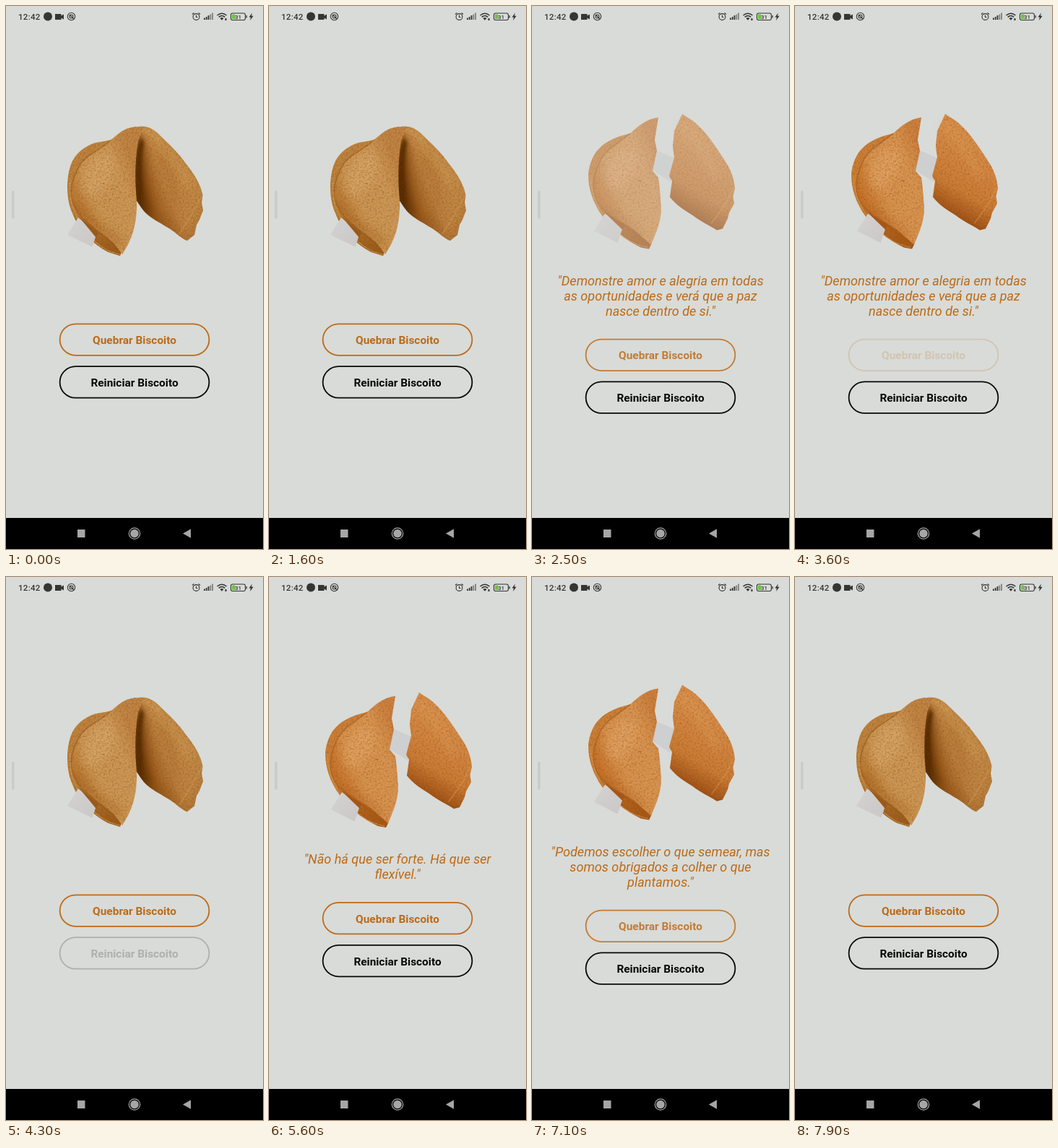
Write an HTML page that moves like this. It is 356 by 752 pixels and loops after 8 s.

```html
<!DOCTYPE html>
<html lang="pt">
<head>
<meta charset="utf-8">
<title>Biscoito da sorte</title>
<style>
  html, body { margin: 0; width: 100%; height: 100%; overflow: hidden; background: #d8dbd8; }
  svg { display: block; width: 356px; height: 752px; }
  text { font-family: Roboto, "Open Sans", sans-serif; }
  .btn { font-size: 15.41px; font-weight: 700; text-anchor: middle; }
  .btn rect { fill: none; stroke-width: 1.8; }
  #quote { font-size: 18.13px; font-style: italic; text-anchor: middle; fill: #bd6a17; }
  #broken { filter: saturate(1.12) hue-rotate(-4deg); }
</style>
</head>
<body>
<svg viewBox="0 0 356 752">
  <defs>
    <linearGradient id="front" gradientUnits="userSpaceOnUse" x1="92" y1="275" x2="184" y2="235">
      <stop offset="0" stop-color="#b9762e"/><stop offset=".3" stop-color="#cb9553"/>
      <stop offset=".75" stop-color="#cd9857"/><stop offset="1" stop-color="#c08444"/>
    </linearGradient>
    <linearGradient id="rim" gradientUnits="userSpaceOnUse" x1="110" y1="190" x2="125" y2="340">
      <stop offset="0" stop-color="#bf8440"/><stop offset=".6" stop-color="#bb7f38"/><stop offset="1" stop-color="#9c5c1b"/>
    </linearGradient>
    <linearGradient id="side" gradientUnits="userSpaceOnUse" x1="180" y1="262" x2="262" y2="232">
      <stop offset="0" stop-color="#693909"/><stop offset=".2" stop-color="#99591a"/>
      <stop offset=".5" stop-color="#bd8140"/><stop offset="1" stop-color="#c28a48"/>
    </linearGradient>
    <linearGradient id="shard" gradientUnits="userSpaceOnUse" x1="196" y1="290" x2="248" y2="200">
      <stop offset="0" stop-color="#8f5117"/><stop offset=".35" stop-color="#bd7f3a"/><stop offset="1" stop-color="#cb9150"/>
    </linearGradient>
    <linearGradient id="paper" x1="0" y1="0" x2="1" y2="1">
      <stop offset="0" stop-color="#d4d2d2"/><stop offset="1" stop-color="#cac7c6"/>
    </linearGradient>
    <filter id="soft" x="-50%" y="-50%" width="200%" height="200%"><feGaussianBlur stdDeviation="6"/></filter>
    <filter id="edge" x="-50%" y="-50%" width="200%" height="200%"><feGaussianBlur stdDeviation="2"/></filter>
    <filter id="crust" color-interpolation-filters="sRGB">
      <feTurbulence type="fractalNoise" baseFrequency=".4" numOctaves="2" seed="4"/>
      <feColorMatrix values="0 0 0 0 .5  0 0 0 0 .28  0 0 0 0 .05  .9 0 0 0 -.38"/>
      <feComposite in2="SourceAlpha" operator="in" result="grain"/>
      <feMerge><feMergeNode in="SourceGraphic"/><feMergeNode in="grain"/></feMerge>
    </filter>
    <clipPath id="rightClip"><use href="#rightShape"/></clipPath>
    <clipPath id="leftClip"><use href="#leftShape"/></clipPath>
  </defs>

  <!-- status bar -->
  <g fill="#343635" stroke="none">
    <text x="17" y="19" font-size="11.5" font-weight="500" letter-spacing=".3">12:42</text>
    <circle cx="58" cy="14.5" r="6"/>
    <path d="M68 11h8.5v2.5l3.5-2v7l-3.5-2v2.500h-8.500z"/>
    <g fill="none" stroke="#343635" stroke-width="1.1">
      <circle cx="90.5" cy="14.5" r="5.2"/><circle cx="90.5" cy="14.5" r="2.5"/><path d="M88 12l6 6"/>
      <circle cx="263.5" cy="15" r="4.4"/><path d="M263.5 12.500v3h2M258 11.500l2.500-2M269 11.500l-2.500-2"/>
      <rect x="311.5" y="10" width="20" height="9.5" rx="2.5"/>
    </g>
    <path d="M274 16.500h1.800v2.500h-1.800zM276.800 15h1.800v4h-1.800zM279.600 13h1.800v6h-1.800z"/>
    <path d="M282.400 11.500h1.800v7.500h-1.800zM285.200 9.500h1.800v9.500h-1.800z" opacity=".55"/>
    <path d="M292.5 13q6.500-5.500 13 0M294.700 15.300q4.300-3.600 8.600 0" fill="none" stroke="#343635" stroke-width="1.5"/>
    <path d="M296.5 17q2.500-2 5 0l-2.500 2.800zM303.500 17h2v3h-2zM332.500 13h1.300v3.500h-1.300z"/>
    <rect x="313" y="11.5" width="4.5" height="6.5" rx="1" fill="#6cc43c"/>
    <text x="321.5" y="17.7" font-size="8" font-weight="500" text-anchor="middle">31</text>
    <path d="M341 9.500l-4.500 6h2.500l-1 4.500 4.700-6.200h-2.700z"/>
  </g>
  <rect x="8" y="255.5" width="3.5" height="39" rx="1.7" fill="#c8cbc9"/>

  <!-- whole cookie -->
  <g id="whole">
    <g filter="url(#crust)">
      <path id="rightShape" fill="url(#side)" d="M184 167C198 165 208 173 217 183C229 194 240 205 249 218C259 231 269 244 272.500 262L271 272 273 283 268 296 264 303 261 317 251 325C244 323 237 315 226 308C210 298 196 292 188 280L180 268L172 200Z"/>
      <g clip-path="url(#rightClip)">
        <path d="M186 184C196 206 190 240 202 290L172 280V190Z" fill="#572c06" opacity=".6" filter="url(#soft)"/>
        <path d="M196 176Q234 205 254 250" fill="none" stroke="#d8a660" stroke-width="13" opacity=".4" filter="url(#soft)"/>
        <path d="M216 210Q236 250 232 300" fill="none" stroke="#a9692a" stroke-width="8" opacity=".35" filter="url(#soft)"/>
        <path d="M198 290Q240 305 252 328L274 290 276 262" fill="none" stroke="#8f5217" stroke-width="7" opacity=".4" filter="url(#soft)"/>
        <path d="M187 181C180 205 177 235 179 270L189 281C192 255 183 220 191 190Z" fill="#542a04" filter="url(#edge)"/>
        <path d="M180 171Q200 168 216 190" fill="none" stroke="#cd9855" stroke-width="8" opacity=".8" filter="url(#edge)"/>
        <path d="M240 315Q262 285 271 262" fill="none" stroke="#d2a05a" stroke-width="2" opacity=".4"/>
      </g>
      <path fill="url(#rim)" d="M148 184C138 189 126 186 113 194C98 202 90 214 87 230C83 250 85 272 92 287C100 310 122 331 142 341L158 346 161 338 150 240Z"/>
      <path id="leftShape" fill="url(#front)" d="M190 168C168 164 157 176 146 185C129 202 110 206 101 224C92 243 89 260 95 277C103 298 138 316 150 329L161 344 167 334C178 315 182 292 181 268C178 240 179 212 183 187Q186 180 190 168Z"/>
      <g clip-path="url(#leftClip)">
        <ellipse cx="128" cy="233" rx="18" ry="32" transform="rotate(28 128 233)" fill="#dcae72" opacity=".5" filter="url(#soft)"/>
        <path d="M95 272Q112 299 160 328" fill="none" stroke="#a2601f" stroke-width="10" opacity=".5" filter="url(#soft)"/>
        <g class="pits" data-x="146" data-y="242"></g>
      </g>
      <path d="M145 186C128 202 109 206 100 224C90 243 87 262 95 278C106 302 136 313 158 341" fill="none" stroke="#9a5a1b" stroke-width="1.6" opacity=".6"/>
      <path d="M89 240Q85 275 107 307T158 344" fill="none" stroke="#d0a060" stroke-width="1.5" opacity=".6"/>
    </g>
    <path d="M100 293L126 314 119.500 333.500 85 317Z" fill="url(#paper)"/>
    <path d="M101 292L128 314 125 321Z" fill="#99591b"/>
  </g>

  <!-- broken cookie -->
  <g id="broken">
    <path d="M167 208L197 221 192 254 165 237Z" fill="#cdcfd0"/>
    <g filter="url(#crust)">
      <path fill="url(#rim)" d="M136 187C122 190 108 195 97 204C85 214 79 229 78 244C78 268 87 287 98 302C112 321 130 335 151 345L162 347 166 339 140 240Z"/>
      <path fill="url(#front)" d="M175 165C158 167 148 176 136 187C119 201 102 208 94 226C86 245 83 264 91 279C101 299 139 315 150 328L165 341C173 323 179 307 179 291Q178 270 175 248L167 239 173 211 170 196Z"/>
      <ellipse cx="124" cy="236" rx="18" ry="30" transform="rotate(28 124 236)" fill="#dcae72" opacity=".5" filter="url(#soft)"/>
      <path d="M101 289Q125 304 156 329" fill="none" stroke="#98581a" stroke-width="7" opacity=".4" filter="url(#soft)"/>
      <g class="pits" data-x="142" data-y="244"></g>
      <path d="M136 187C119 202 102 208 94 226C85 245 82 264 90 280C101 303 134 314 163 344" fill="none" stroke="#9a5a1b" stroke-width="1.6" opacity=".6"/>
      <path d="M81 245Q81 278 104 308T160 345" fill="none" stroke="#d0a060" stroke-width="1.5" opacity=".6"/>
      <path fill="url(#shard)" d="M208 160L222 169C241 183 254 205 266 223C276 237 280 250 281 263L278.500 274 280 284 273 297 271 305 264 319 256 321C246 314 235 310 222 300C209 292 200 286 191 275L194 253 190 246 197 220 195 205 197 184Z"/>
      <path d="M204 176Q240 205 256 250" fill="none" stroke="#dcab69" stroke-width="10" opacity=".35" filter="url(#soft)"/>
      <path d="M248 312Q270 285 279 262" fill="none" stroke="#d2a05a" stroke-width="2" opacity=".4"/>
    </g>
    <path d="M101 298L127 314 118.500 338.500 86 322Z" fill="url(#paper)"/>
    <path d="M101 297L128 313 126 321Z" fill="#99591b"/>
  </g>

  <g id="quote"></g>
  <g id="buttons">
    <g class="btn" id="crack" fill="#bd6a17">
      <rect x="74.6" y="440.3" width="206.8" height="43.5" rx="21.75" stroke="#bd6a17"/>
      <text x="178" y="468.2">Quebrar Biscoito</text>
    </g>
    <g class="btn" id="reset" fill="#080808">
      <rect x="74.6" y="499.2" width="206.8" height="43.5" rx="21.75" stroke="#080808"/>
      <text x="178" y="527.1">Reiniciar Biscoito</text>
    </g>
  </g>

  <!-- navigation bar -->
  <rect y="709" width="356" height="43"/>
  <g fill="#a6a6a6">
    <rect x="99" y="725" width="10.5" height="11"/>
    <circle cx="178" cy="730.5" r="5.8"/>
    <circle cx="178" cy="730.5" r="7.7" fill="none" stroke="#a6a6a6" stroke-width="1.2"/>
    <path d="M245 730.500L256 724.300V736.700Z"/>
  </g>
</svg>
<script>
const $ = id => document.getElementById(id);
const LOOP = 8000, STEP = 100, LINE = 21.25;

// [start ms, lines of the message]; no lines means the cookie is whole
const scenes = [
  [0, []],
  [2300, ['"Demonstre amor e alegria em todas', 'as oportunidades e verá que a paz', 'nasce dentro de si."']],
  [3800, ['"Há três coisas que jamais voltam;', 'a flecha lançada, a palavra dita e', 'a oportunidade perdida."']],
  [4300, []],
  [5300, ['"Não há que ser forte. Há que ser', 'flexível."']],
  [6300, ['"São os nossos amigos que nos', 'ensinam as mais valiosas lições."']],
  [6900, ['"Podemos escolher o que semear, mas', 'somos obrigados a colher o que', 'plantamos."']],
  [7500, []]
];

// [finger down, finger up] in ms
const presses = {
  crack: [[2110, 2300], [3440, 3800], [5110, 5300], [6110, 6300], [6710, 6900]],
  reset: [[4200, 4300], [7340, 7500]]
};

const clamp = v => Math.min(1, Math.max(0, v));

function pressAlpha(list, t) {
  const press = list.findLast(p => p[0] <= t);
  if (!press) return 1;
  const [down, up] = press;
  return t < up ? 1 - .8 * clamp((t - down) / 90) : .2 + .8 * clamp((t - up) / 250);
}

// small pits scattered over the crust
document.querySelectorAll('.pits').forEach(g => {
  let seed = 7, out = '';
  const rnd = () => (seed = seed * 16807 % 2147483647) / 2147483647;
  rnd();
  for (let i = 0; i < 26; i++) {
    const x = +g.dataset.x + (rnd() - .5) * 46, y = +g.dataset.y + (rnd() - .5) * 60;
    out += `<ellipse cx="${x}" cy="${y}" rx="${1 + rnd()}" ry=".7" fill="#a86a2a" opacity=".5"/>`;
  }
  g.innerHTML = out;
});

let shown;
function render(t) {
  const scene = scenes.findLast(s => s[0] <= t);
  const [start, lines] = scene, n = lines.length;
  if (scene !== shown) {
    shown = scene;
    const shift = Math.max(0, n - 1) * LINE / 2;
    $('quote').innerHTML = lines.map((s, i) =>
      `<text x="178" y="${407.8 + (i - (n - 1) / 2) * LINE}">${s}</text>`).join('');
    $('buttons').setAttribute('transform', `translate(0 ${shift})`);
    $('broken').setAttribute('transform', `translate(0 ${LINE / 2 - shift})`);
    $('whole').style.display = n ? 'none' : '';
    $('broken').style.display = n ? '' : 'none';
  }
  // the broken picture fades in only the first time it is loaded
  $('broken').style.opacity = start === 2300 ? clamp((t - start) / 300) : 1;
  for (const id in presses) $(id).style.opacity = pressAlpha(presses[id], t);
}

const begin = performance.now();
function tick() {
  const t = (performance.now() - begin) % LOOP;
  render(Math.floor(t / STEP) * STEP);
  requestAnimationFrame(tick);
}
tick();
</script>
</body>
</html>
```
